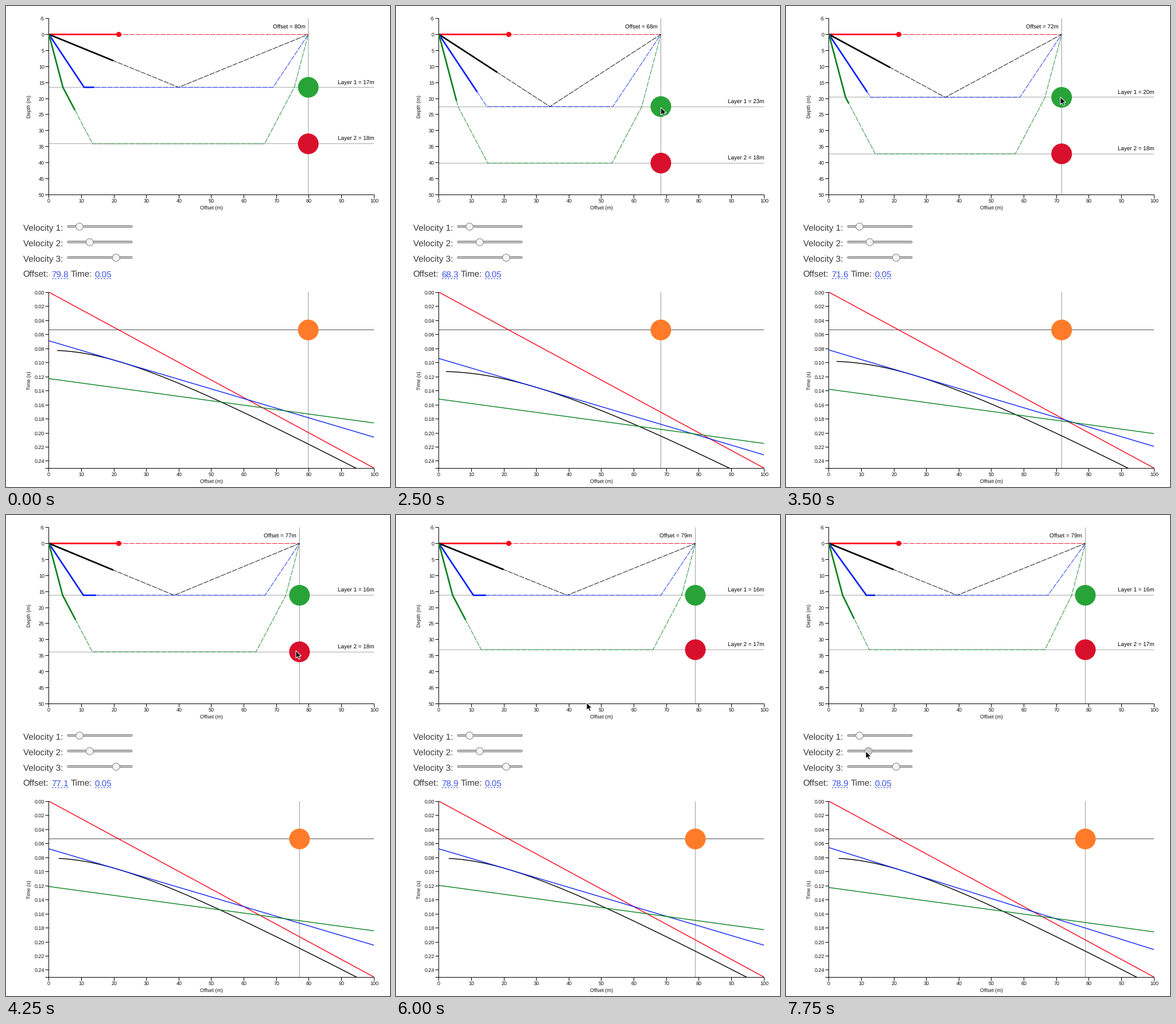
These frames come from a looping animation (669 px wide and 837 px high, 8 s). A matplotlib script:

```python
import numpy as np
import matplotlib as mpl
import matplotlib.pyplot as plt
from matplotlib.animation import FuncAnimation
from matplotlib.patches import Circle, FancyBboxPatch, Polygon, Rectangle

mpl.rcParams["font.family"] = "Liberation Sans"
mpl.rcParams["text.hinting"] = "none"

W, H, DPI = 669, 837, 64
PT = 72 / DPI                      # points per pixel
STEP, FRAMES = 250, 32

LEFT, RIGHT = 74.8, 641
DEPTH_TOP, DEPTH_BOTTOM = 21.6, 328
TIME_TOP, TIME_BOTTOM = 498, 804
V1, V3 = 400, 1587
NOW = 0.0537                       # travel time shown by the wavefronts

RED, BLUE, GREEN, BLACK = "#ff0018", "#0a22f5", "#0a8220", "#000000"
GREY, LINK, INK = "#b0b0b0", "#3d55e8", "#383838"

fig = plt.figure(figsize=(W / DPI, H / DPI), dpi=DPI, facecolor="white")
ax = fig.add_axes([0, 0, 1, 1])
ax.set_xlim(0, W)
ax.set_ylim(H, 0)
ax.axis("off")


def px(x):
    return LEFT + np.asarray(x) * (RIGHT - LEFT) / 100


def py_depth(d):
    return DEPTH_TOP + (np.asarray(d) + 5) * (DEPTH_BOTTOM - DEPTH_TOP) / 55


def py_time(t):
    return TIME_TOP + np.asarray(t) * (TIME_BOTTOM - TIME_TOP) / 0.25


def crisp(v):
    return np.floor(v) + 0.5


def line(xs=(), ys=(), color=BLACK, width=1.0, z=2, **kw):
    artist, = ax.plot(xs, ys, color=color, lw=width * PT, zorder=z,
                      snap=False, solid_capstyle="butt",
                      dash_capstyle="butt", **kw)
    return artist


def text(x, y, s, size=9, color="#111111", ha="left", **kw):
    return ax.text(x, y, s, fontsize=size * PT, color=color, ha=ha,
                   va=kw.pop("va", "baseline"), zorder=8, **kw)


def disc(color, r=18, z=6, **kw):
    return ax.add_patch(Circle((0, 0), r, fc=color, zorder=z, **kw))


def axes_frame(top, bottom, ticks, to_y, fmt, title):
    x0, base = crisp(LEFT), crisp(bottom)
    line([x0, x0], [top, bottom + 1])
    line([x0 - 6, RIGHT + 0.5], [base, base])
    for v in ticks:
        y = crisp(to_y(v) + 0.2)
        line([x0 - 6, x0], [y, y])
        text(67, y + 3.0, fmt.format(v), ha="right")
    for v in range(0, 101, 10):
        x = crisp(px(v))
        line([x, x], [base, base + 6])
        text(x, bottom + 14, str(v), ha="center")
    text(357.8, bottom + 26.3, "Offset (m)", ha="center")
    text(40.5, (top + bottom) / 2 + 0.5, title, ha="center", va="center",
         rotation=90)


axes_frame(DEPTH_TOP, DEPTH_BOTTOM, range(-5, 51, 5), py_depth, "{}",
           "Depth (m)")
axes_frame(TIME_TOP, TIME_BOTTOM, np.arange(0, 0.25, 0.02), py_time,
           "{:.2f}", "Time (s)")


# Sliders
def knob_x(v):
    return 112 + (v - 100) / 1900 * 102


def slider(row, v):
    y = 384 + 27 * row
    text(29.6, y + 6.6, f"Velocity {row + 1}:", 15.2, INK)
    ax.add_patch(FancyBboxPatch(
        (107, y - 2), 113, 3.4, boxstyle="round,pad=0,rounding_size=1.7",
        fc="#c4c4c4", ec="#8a8a8a", lw=PT, zorder=2))
    line([107, 220], [y - 1.5, y - 1.5], "#8f8f8f")
    knob = disc("#f4f4f4", 6.3, 3, ec="#858585", lw=PT)
    knob.center = (knob_x(v), y)
    return knob


slider(0, V1)
knob2 = slider(1, 730)
slider(2, V3)

# Readout
text(29.6, 472, "Offset:", 15.2, INK)
text(112.7, 472, "Time:", 15.2, INK)
offset_value = text(79.3, 472, "", 15.2, LINK)
text(154.5, 472, "0.05", 15.2, LINK)
for x in (80, 155):
    line([x, x + 29.5], [474.5, 474.5], LINK, dashes=(3, 2))

# Guides and handles
guide_top = line(color=GREY, width=1.35, z=1)
guide_low = line(color=GREY, width=1.35, z=1)
layers = [line(color=GREY, width=1.1, z=1) for _ in range(2)]
y_now = py_time(NOW)
line([LEFT, RIGHT], [crisp(y_now)] * 2, "#505050", z=3)
handles = [disc("#27a338"), disc("#d9102b"), disc("#ff7b29")]
offset_label = text(0, 39, "", 9.9, BLACK, "right")
layer_labels = [text(641.3, 0, "", 9.9, BLACK, "right") for _ in range(2)]

# Rays and travel-time curves, from the direct wave to the deepest one
COLORS = (RED, BLACK, BLUE, GREEN)
dashed = [line(color=c, width=0.9, z=3, dashes=(10, 2)) for c in COLORS]
solid = [line(color=c, width=2.7, z=4) for c in COLORS]
front = disc(RED, 4.5, 5)
front.center = (px(V1 * NOW), py_depth(0))
clip = Rectangle((LEFT, TIME_TOP), RIGHT - LEFT, TIME_BOTTOM - TIME_TOP,
                 transform=ax.transData)
curves = [line(color=c, width=1.4, z=4) for c in COLORS]
for c in curves:
    c.set_clip_path(clip)

ARROW = np.array([(0, 0), (0, 13), (3, 10.3), (5.2, 15), (7.5, 14),
                  (5.3, 9.4), (9.4, 9.2)])
cursor = ax.add_patch(Polygon(ARROW, fc="black", ec="white", lw=PT,
                              zorder=10))

# Keys: time, then value(s)
OFFSET = [(1750, 79.8), (3000, 60.6), (3750, 77.1), (4250, 77.1),
          (5000, 78.6), (5750, 78.9)]
LAYER1 = [(1750, 16.52), (3000, 26.55), (3750, 16.2)]
LAYER2 = [(4250, 17.65), (5000, 16.2), (5750, 17.0)]
SPEED2 = [(6250, 730), (6750, 926), (7750, 690)]
CURSOR = [(750, 548, 800), (1000, 528, 152), (1250, 528, 152),
          (1500, 521, 149), (1750, 521, 149), (3000, 422, 195),
          (3750, 506, 140), (4250, 505, 236), (5000, 517, 235),
          (5750, 519, 239), (6250, 145, 414), (6750, 154, 415),
          (7750, 139, 411)]


def at(keys, ms, col=1):
    return np.interp(ms, [k[0] for k in keys], [k[col] for k in keys])


def angle(a, b):
    """Cosine and tangent of the critical angle."""
    s = a / b
    c = np.sqrt(1 - s * s)
    return c, s / c


def travelled(path, speeds, t):
    """Part of the path covered after time t."""
    done = [path[0]]
    for a, b, v in zip(path, path[1:], speeds):
        need = np.hypot(b[0] - a[0], b[1] - a[1]) / v
        k = min(1, t / need)
        done.append((a[0] + k * (b[0] - a[0]), a[1] + k * (b[1] - a[1])))
        t -= need
        if t <= 0:
            break
    return done


def show(artist, path):
    xs, ys = zip(*path)
    artist.set_data(px(xs), py_depth(ys))


def draw(i):
    ms = i * STEP
    off, h1, h2 = at(OFFSET, ms), at(LAYER1, ms), at(LAYER2, ms)
    v2 = at(SPEED2, ms)
    deep = h1 + h2
    c12, t12 = angle(V1, v2)
    c13, t13 = angle(V1, V3)
    c23, t23 = angle(v2, V3)

    a = h1 * t12
    b = h1 * t13
    c = b + h2 * t23
    rays = [
        ([(0, 0), (off, 0)], (V1,)),
        ([(0, 0), (off / 2, h1), (off, 0)], (V1, V1)),
        ([(0, 0), (a, h1), (off - a, h1), (off, 0)], (V1, v2, V1)),
        ([(0, 0), (b, h1), (c, deep), (off - c, deep), (off - b, h1),
          (off, 0)], (V1, v2, V3, v2, V1)),
    ]
    for (path, speeds), thin, thick in zip(rays, dashed, solid):
        show(thin, path)
        show(thick, travelled(path, speeds, NOW))

    x = np.linspace(0, 100, 201)
    start = np.interp(h1, [16.2, 16.52, 26.55], [3, 2.5, 2])
    xr = np.linspace(start, 100, 201)
    head1 = 2 * h1 * c12 / V1
    head2 = 2 * h1 * c13 / V1 + 2 * h2 * c23 / v2
    data = [(x, x / V1), (xr, np.hypot(xr, 2 * h1) / V1),
            (x, head1 + x / v2), (x, head2 + x / V3)]
    for curve, (u, t) in zip(curves, data):
        curve.set_data(px(u), py_time(t))

    gx = px(off)
    guide_top.set_data([gx, gx], [DEPTH_TOP, DEPTH_BOTTOM])
    guide_low.set_data([gx, gx], [TIME_TOP, TIME_BOTTOM])
    for n, (d, h) in enumerate(((h1, h1), (deep, h2))):
        y = py_depth(d)
        layers[n].set_data([LEFT, RIGHT], [crisp(y)] * 2)
        layer_labels[n].set_text(f"Layer {n + 1} = {h:.0f}m")
        layer_labels[n].set_y(y - 5.5)
        handles[n].center = (gx, y)
    handles[2].center = (gx, y_now)
    offset_label.set_text(f"Offset = {off:.0f}m")
    offset_label.set_x(gx - 5.3)
    offset_value.set_text(f"{off:.1f}")

    knob2.center = (knob_x(v2), 411)
    knob2.set_facecolor("#cdcdcd" if ms >= 6250 else "#f4f4f4")
    cursor.set_visible(ms >= 750)
    cursor.set_xy(ARROW + (at(CURSOR, ms), at(CURSOR, ms, 2)))
    return []


anim = FuncAnimation(fig, draw, frames=FRAMES, interval=STEP, repeat=True,
                     init_func=lambda: draw(0))
plt.show()
```
